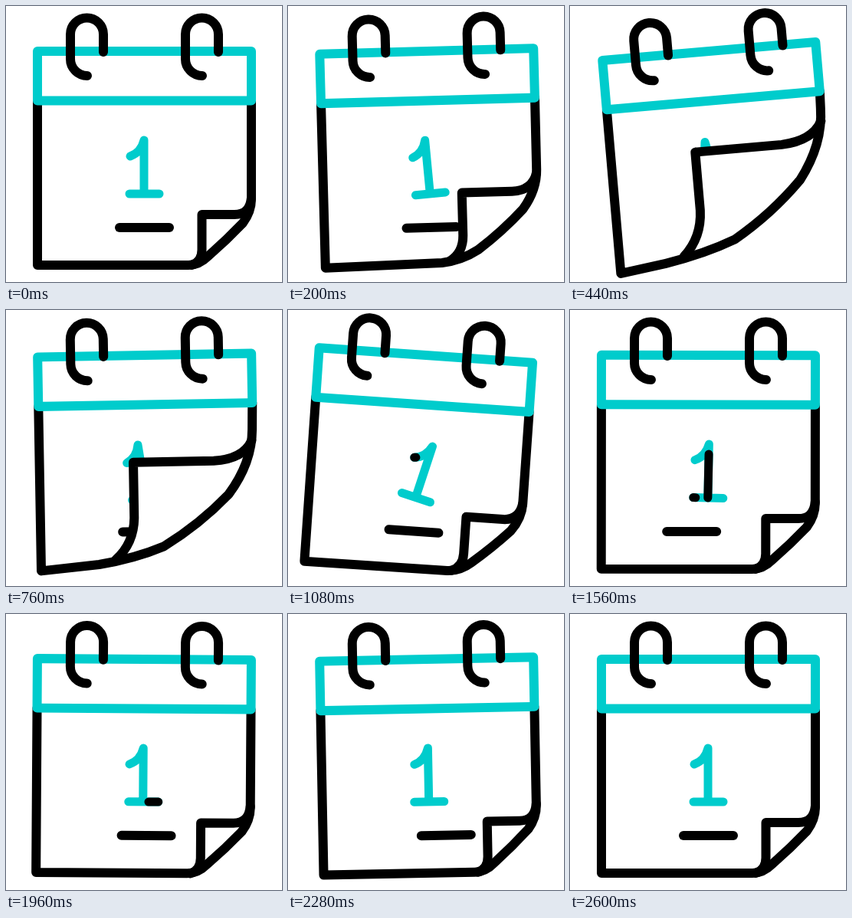
Animation, 360 px wide and 360 px high, one loop 3.2 s. Source, as an HTML page:

```html
<!DOCTYPE html>
<html>
<head>
<meta charset="utf-8">
<title>Calendar</title>
<style>
  html, body { margin: 0; height: 100%; overflow: hidden; background: #fff; }
  svg { display: block; width: 100vw; height: 100vh; }
  path { fill: none; stroke: #000; stroke-width: 12; stroke-linecap: round; stroke-linejoin: round; }
  .teal { stroke: #00cccc; }
  #digit path { stroke-width: 11; }
  #cover { fill: #fff; stroke: none; }
</style>
</head>
<body>
<svg viewBox="0 0 360 360">
  <g id="calendar">
    <g id="digit">
      <path class="teal" d="M162 196Q176 191 180 175V245M161 245H200"/>
      <path id="stemDash" d="M162 196Q176 191 180 175V245"/>
      <path id="footDash" d="M161 245H200"/>
    </g>
    <path id="line" d="M148 289H213"/>
    <path id="cover"/>
    <path id="page"/>
    <path id="fold"/>
    <path class="teal" d="M41 59H320V123.5H41Z"/>
    <path id="ring" d="M127 60V37A21.5 21.5 0 0 0 84 37V69A22 22 0 0 0 106 91"/>
    <use href="#ring" x="150"/>
  </g>
</svg>
<script>
const LOOP = 3200, END = 2600, STEP = 40;
const DASH = 60, DASH_START = 1070, DASH_SPEED = 0.208;
const $ = id => document.getElementById(id);

// Keys are [time, value] pairs, eased in and out between neighbours.
const swing = [[0, 0], [600, -6], [960, 6], [1350, -3], [1765, 3], [2115, -1.5], [END, 0]];
const peel = [[0, 0], [570, 1.022], [1175, 0]];
const tilt = [[0, 0], [600, -15], [1128, 15], [1650, 0]];
const slide = [[1100, 0], [1600, -22], [2240, 22], [END, 0]];

function ease(keys, t) {
  const next = keys.findIndex(key => key[0] > t);
  if (next === 0) return keys[0][1];
  if (next < 0) return keys[keys.length - 1][1];
  const [t0, a] = keys[next - 1], [t1, b] = keys[next];
  const k = (t - t0) / (t1 - t0);
  return a + (b - a) * k * k * (3 - 2 * k);
}

function drawPage(p) {
  const at = (x, y, dx, dy) => `${x + dx * p} ${y + dy * p} `;
  const corner = at(255.5, 272, -117.6, -94);
  const down = `L${at(255.5, 318, -117.6, -60)}Q${at(255.5, 334, -119, -38)}${at(242, 338, -132, -17)}`;
  const bend = at(298, 272, -38, -94), bendControl = at(318, 272, -14, -96);
  const edge = at(320, 250, -2, -99);
  $('fold').setAttribute('d', `M${corner}${down}M${corner}L${bend}Q${bendControl}${edge}`);
  $('cover').setAttribute('d', `M${corner}${down}L400 400L${edge}Q${bendControl}${bend}Z`);
  $('page').setAttribute('d', `M320 123.5L${at(320, 252, -1, -120)}`
    + `Q${at(320, 268, -2, -85)}${at(309, 283, -28, -52)}`
    + `Q${at(288, 305, -50, -31)}${at(264, 326, -80, -22)}`
    + `Q${at(252, 338, -113, -18)}${at(238, 338, -155, -9)}L41 338V123.5`);
}

function drawDash(path, head) {
  const visible = head > 0 && head < path.getTotalLength() + DASH;
  path.style.display = visible ? '' : 'none';
  path.setAttribute('stroke-dasharray', `${DASH} 400`);
  path.setAttribute('stroke-dashoffset', DASH - head);
}

function draw(t) {
  $('calendar').setAttribute('transform', `rotate(${ease(swing, t)} 180 50)`);
  $('digit').setAttribute('transform', `rotate(${ease(tilt, t)} 180 245)`);
  $('line').setAttribute('transform', `translate(${ease(slide, t)})`);
  drawPage(ease(peel, t));
  const head = (t - DASH_START) * DASH_SPEED;
  drawDash($('stemDash'), head);
  drawDash($('footDash'), head - $('stemDash').getTotalLength());
}

function tick() {
  const t = Math.floor(performance.now() % LOOP / STEP) * STEP;
  draw(Math.min(t, END));
  requestAnimationFrame(tick);
}
tick();
</script>
</body>
</html>
```
